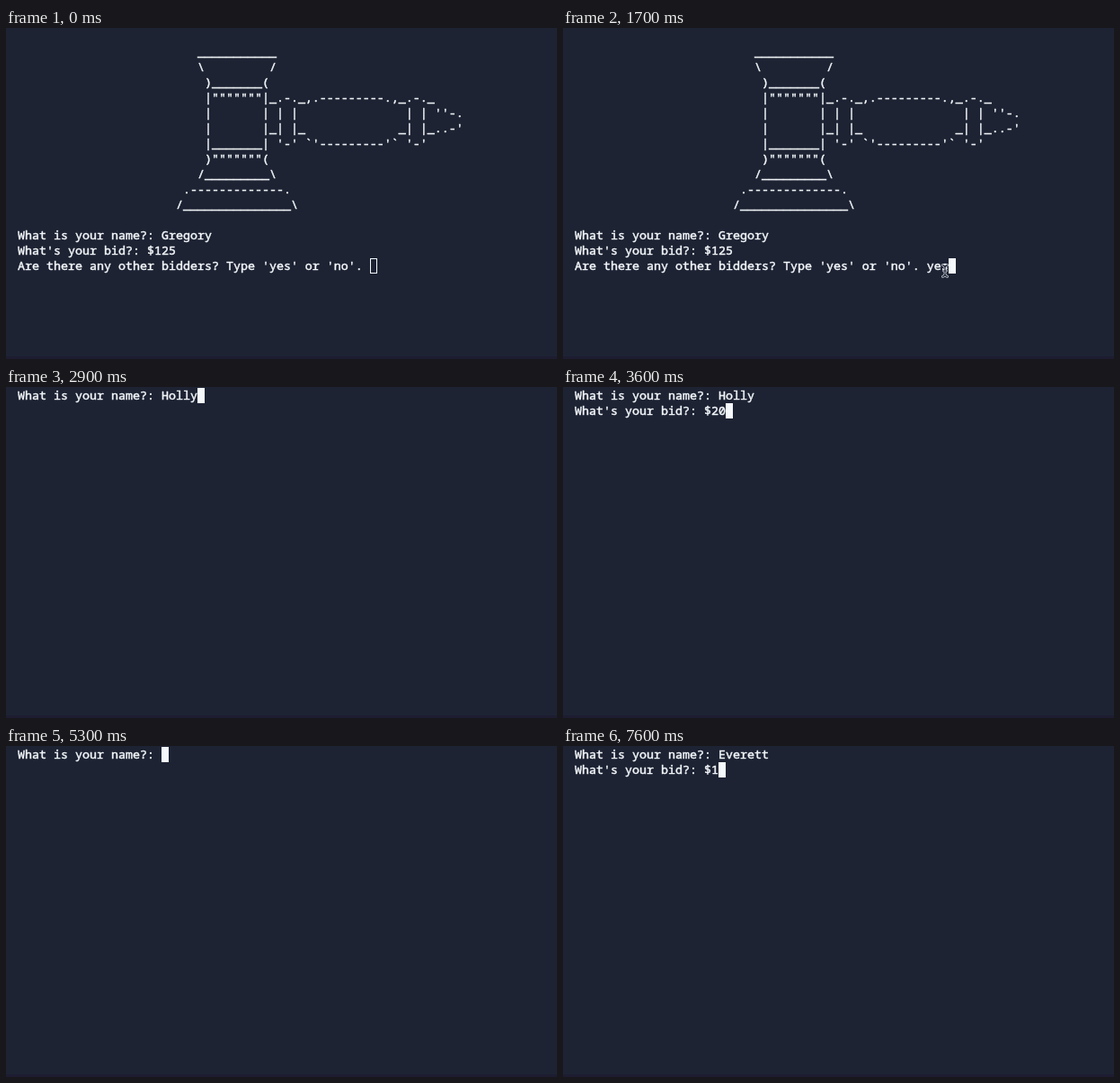
Recreate the animation shown at these times as an HTML page. Size 613 px wide and 368 px high, loop 8 s.

```html
<!DOCTYPE html>
<html lang="en">
<head>
<meta charset="utf-8">
<title>Secret auction</title>
<style>
  html, body { margin: 0; width: 100%; height: 100%; overflow: hidden; background: #1d2333; }
  svg { display: block; width: 613px; height: 368px; }
  text {
    font: 13.333px "Noto Sans Mono", "DejaVu Sans Mono", monospace;
    fill: #f5f9fc; stroke: #f5f9fc; stroke-width: 0.45px;
    white-space: pre; font-variant-ligatures: none;
  }
</style>
</head>
<body>
<svg viewBox="0 0 613 368">
  <defs>
    <path id="beam" d="M-2.6-6.4Q0-5.6 0-3.6Q0-5.6 2.6-6.4M0-3.6V3.6M-2.6 6.4Q0 5.6 0 3.6Q0 5.6 2.6 6.4M-1.4 0H1.4"/>
  </defs>
  <rect width="613" height="368" fill="#1d2333"/>
  <rect y="365" width="613" height="3" fill="#1d1c31"/>
  <g id="rows"></g>
  <rect id="caret" stroke="#f5f9fc"/>
  <g id="pointer" fill="none" stroke-linecap="round" stroke-linejoin="round">
    <use href="#beam" stroke="#c9cdd4" stroke-width="2.8"/>
    <use href="#beam" stroke="#1d2333" stroke-width="1.1"/>
  </g>
</svg>
<script>
const LOOP = 8000, CELL = 8, ROW = 17, LEFT = 13, TOP = 1;
const ASK_NAME = "What is your name?: ";
const ASK_BID = "What's your bid?: $";
const ASK_MORE = "Are there any other bidders? Type 'yes' or 'no'. ";

const gavel = String.raw`
                         ___________
                         \         /
                          )_______(
                          |"""""""|_.-._,.---------.,_.-._
                          |       | | |               | | ''-.
                          |       |_| |_             _| |_..-'
                          |_______| '-' ${"`"}'---------'${"`"} '-'
                          )"""""""(
                         /_________\
                       .-------------.
                      /_______________\
`.split("\n");

// Each field: prompt, answer, time the prompt appears, key times.
const rounds = [
  { start: 0, head: gavel, fields: [
    [ASK_NAME + "Gregory", "", 0, []],
    [ASK_BID + "125", "", 0, []],
    [ASK_MORE, "yes", 0, [1200, 1300, 1700]]
  ] },
  { start: 2000, head: [], fields: [
    [ASK_NAME, "Holly", 2000, [2400, 2600, 2700, 2800, 2900]],
    [ASK_BID, "200", 3200, [3400, 3600, 3700]],
    [ASK_MORE, "yes", 4000, [4900, 5000, 5100]]
  ] },
  { start: 5300, head: [], fields: [
    [ASK_NAME, "Everett", 5300, [6000, 6100, 6200, 6400, 6500, 6700, 6900]],
    [ASK_BID, "1", 7000, [7600]]
  ] }
];

const $ = id => document.getElementById(id);
const set = (el, attrs) => Object.entries(attrs).forEach(([k, v]) => el.setAttribute(k, v));

const lines = Array.from({ length: 16 }, (_, i) => {
  const el = document.createElementNS("http://www.w3.org/2000/svg", "text");
  set(el, { x: LEFT, y: TOP + ROW * i + 13.3 });
  return $("rows").appendChild(el);
});

function screenAt(t) {
  const round = rounds.findLast(r => t >= r.start);
  const typed = round.fields
    .filter(field => t >= field[2])
    .map(([prompt, answer, , keys]) => prompt + answer.slice(0, keys.filter(k => t >= k).length));
  return [...round.head, ...typed];
}

function drawCaret(screen, focused) {
  const row = screen.length - 1;
  const inset = focused ? 0 : 0.5;
  set($("caret"), {
    x: LEFT + CELL * screen[row].length + inset,
    y: TOP + ROW * row + inset,
    width: CELL - 2 * inset,
    height: ROW - 2 * inset,
    fill: focused ? "#f5f9fc" : "none",
    "stroke-width": focused ? 0 : 1
  });
}

function drawPointer(t) {
  const left = 1 - Math.min(1, Math.floor(t / 100) / 7);
  const away = left * left;
  set($("pointer"), {
    transform: `translate(${425 - 20 * away} ${270 + 108 * away})`,
    visibility: t < 2600 ? "visible" : "hidden"
  });
}

function draw(t) {
  const screen = screenAt(t);
  lines.forEach((el, i) => {
    const text = screen[i] || "";
    if (el.textContent !== text) el.textContent = text;
  });
  drawCaret(screen, t >= 700);
  drawPointer(t);
}

const began = performance.now();
function tick() {
  draw((performance.now() - began) % LOOP);
  requestAnimationFrame(tick);
}
draw(0);
requestAnimationFrame(tick);
</script>
</body>
</html>
```
